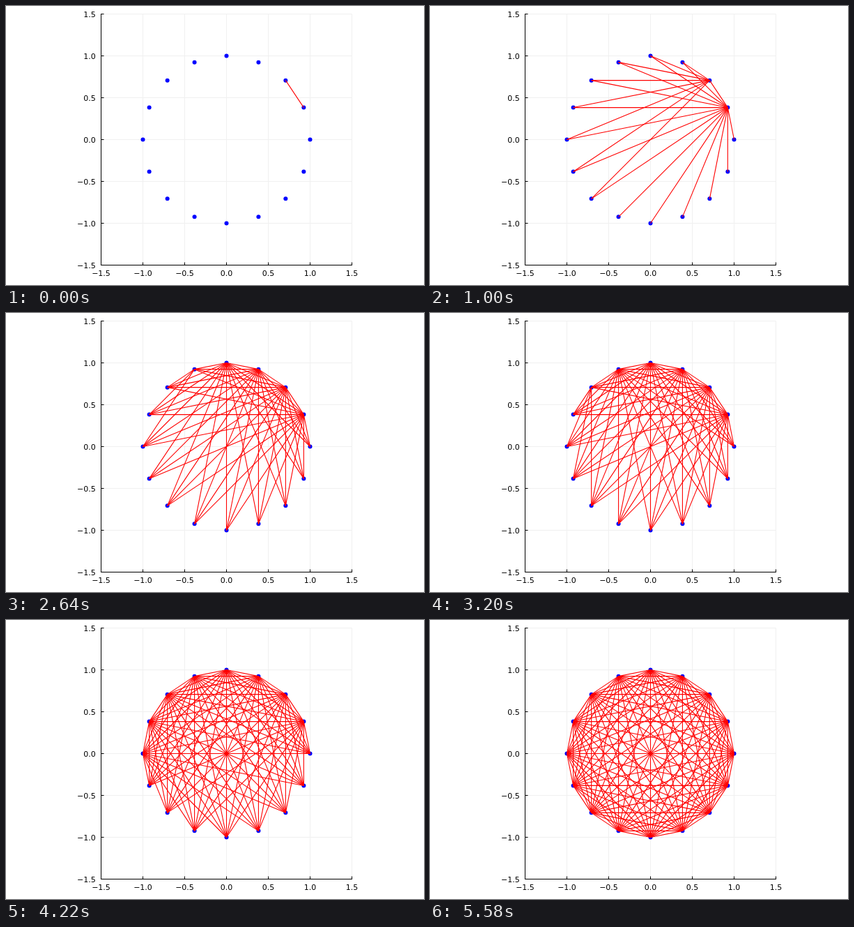
An HTML page with a canvas for the animation above (5680 ms loop, 600 by 400 pixels).

```html
<!DOCTYPE html>
<html lang="en">
<head>
<meta charset="utf-8">
<title>Chords of a circle</title>
<style>
  html, body { margin: 0; width: 100%; height: 100%; overflow: hidden; background: #fff; }
  canvas { display: block; }
</style>
</head>
<body>
<canvas id="plot" width="600" height="400"></canvas>
<script>
const ctx = document.getElementById("plot").getContext("2d");
const COUNT = 16, UNIT = 120, LOOP = 5680;
const px = x => 316.5 + UNIT * x;
const py = y => 191.5 - UNIT * y;

const points = Array.from({ length: COUNT }, (_, i) => {
  const angle = 2 * Math.PI * (i + 1) / COUNT;
  return [px(Math.cos(angle)), py(Math.sin(angle))];
});

// Every pair of points, in drawing order
const chords = points.flatMap((a, i) => points.slice(i + 1).map(b => [...a, ...b]));

function line(x1, y1, x2, y2, color) {
  ctx.strokeStyle = color;
  ctx.beginPath();
  ctx.moveTo(x1, y1);
  ctx.lineTo(x2, y2);
  ctx.stroke();
}

function label(text, x, y, align) {
  ctx.textAlign = align;
  ctx.fillText(text, x, y);
}

function drawAxes() {
  const left = px(-1.5), right = px(1.5), top = py(1.5), bottom = py(-1.5);
  const ticks = [-1.5, -1, -0.5, 0, 0.5, 1, 1.5];
  for (const v of ticks) {
    line(px(v), top, px(v), bottom, "#f0f0f0");
    line(left, py(v), right, py(v), "#f0f0f0");
  }
  line(left, top - 0.5, left, bottom + 0.5, "#000");
  line(left - 0.5, bottom, right + 0.5, bottom, "#000");
  ctx.font = '11px "DejaVu Sans", sans-serif';
  ctx.fillStyle = "#000";
  for (const v of ticks) {
    const text = v.toFixed(1).replace("-", "\u2212");
    line(px(v), bottom, px(v), bottom - 4, "#000");
    line(left, py(v), left + 4, py(v), "#000");
    label(text, px(v), 387, "center");
    label(text, 128.7, py(v) + 4.3, "right");
  }
}

function drawPoints() {
  ctx.fillStyle = "#00f";
  for (const [x, y] of points) {
    ctx.beginPath();
    ctx.arc(x, y, 3, 0, 2 * Math.PI);
    ctx.fill();
  }
}

// Chords arrive in threes, with a pause after the second of each three
function chordsAt(time) {
  const rest = time % 140;
  const shown = 3 * Math.floor(time / 140) + 1 + (rest >= 20) + (rest >= 120);
  return Math.min(shown, chords.length);
}

function draw(now) {
  ctx.clearRect(0, 0, 600, 400);
  ctx.lineWidth = 1;
  drawAxes();
  drawPoints();
  ctx.lineWidth = 1.1;
  for (const chord of chords.slice(0, chordsAt(now % LOOP))) line(...chord, "#f00");
}

let start;
function tick(now) {
  start ??= now;
  draw(now - start);
  requestAnimationFrame(tick);
}
requestAnimationFrame(tick);
</script>
</body>
</html>
```
